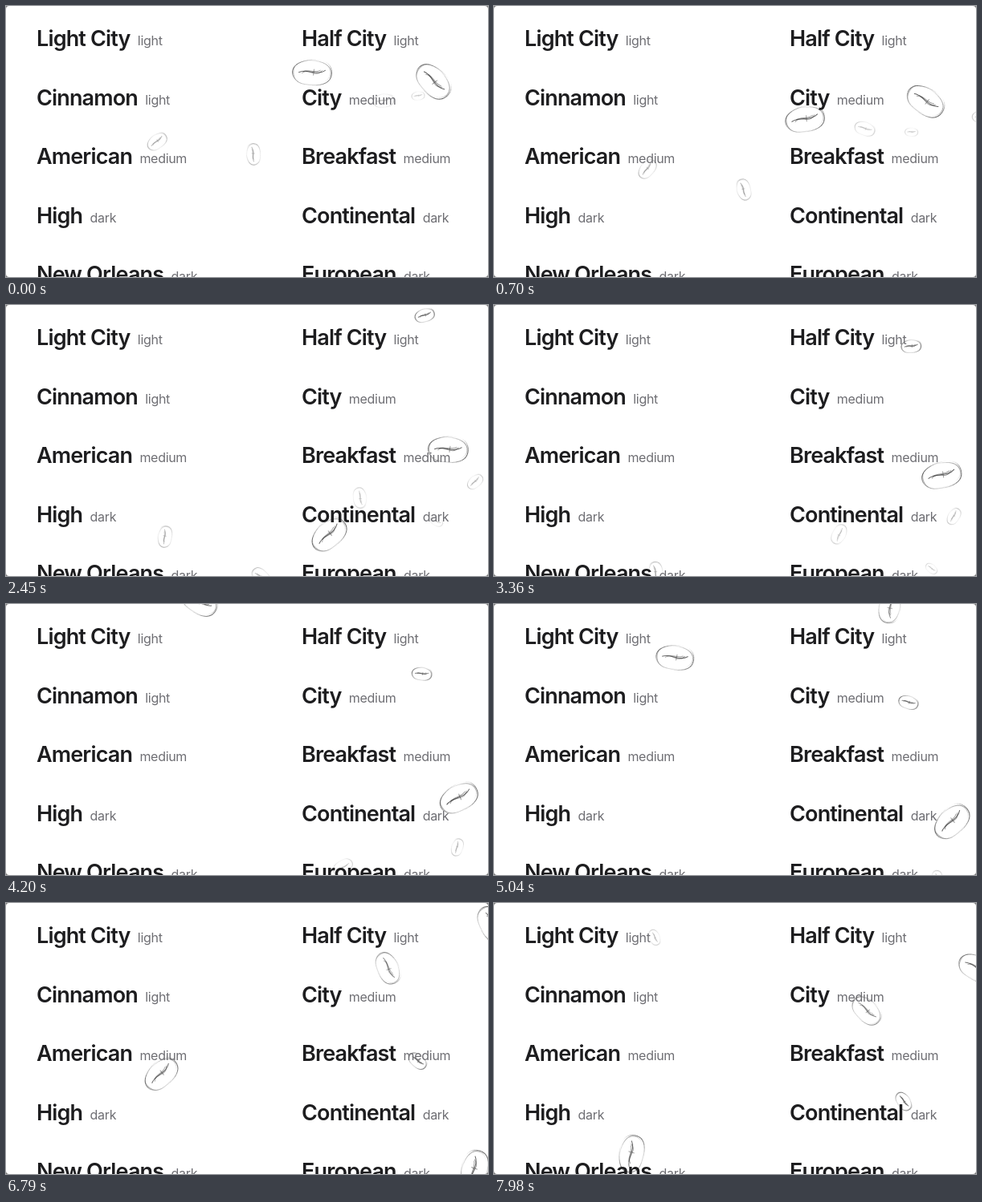
Write an HTML page with a canvas that moves like this. It is 600 px wide and 338 px high and loops after 8000 ms.

```html
<!DOCTYPE html>
<html lang="en">
<head>
<meta charset="utf-8">
<title>Coffee roasts</title>
<style>
  html, body { margin: 0; width: 100%; height: 100%; overflow: hidden; background: #fff; }
  canvas, svg { position: absolute; left: 0; top: 0; width: 600px; height: 338px; }
  text { font-family: Inter, "Open Sans", sans-serif; }
  .name { font-size: 27px; font-weight: 600; letter-spacing: -.85px; fill: #1d1d1f; }
  .level { font-size: 16px; font-weight: 400; letter-spacing: -.3px; fill: #6e6e73; }
</style>
</head>
<body>
<canvas id="stage"></canvas>
<svg id="labels" viewBox="0 0 600 338"></svg>
<script>
const W = 600, H = 338, LOOP = 8000, STEP = 70;
const TAU = 2 * Math.PI;

const roasts = [
  "Light City/light", "Half City/light",
  "Cinnamon/light", "City/medium",
  "American/medium", "Breakfast/medium",
  "High/dark", "Continental/dark",
  "New Orleans/dark", "European/dark"
];

const svg = document.getElementById("labels");
function svgChild(parent, tag, attrs, str = "") {
  const el = document.createElementNS("http://www.w3.org/2000/svg", tag);
  for (const key in attrs) el.setAttribute(key, attrs[key]);
  el.textContent = str;
  return parent.appendChild(el);
}
roasts.forEach((roast, i) => {
  const [name, level] = roast.split("/");
  const line = svgChild(svg, "text", { x: 38 + 330 * (i % 2), y: 50 + 73.6 * (i >> 1) });
  svgChild(line, "tspan", { class: "name" }, name);
  svgChild(line, "tspan", { class: "level", dx: 9.3, dy: -1 }, level);
});

// Place at the loop start; speeds per second. Smaller beans are farther, so fainter.
function bean(x, y, tilt, size, { fall = 46, drift = 4, spin = -18, ink = .75 * (size / 51) ** 1.5 }) {
  return { x, y, tilt, size, fall, drift, spin, ink };
}

const beans = [
  bean(381, 83, 0, 51, { fall: 83, drift: 8.6 }),
  bean(532, 94, 45, 52, { fall: 35.2, drift: 7.5 }),
  bean(470, 118, -10, 27, { fall: 50, drift: -12, spin: 37, ink: .2 }),
  bean(513, 112, -10, 17, { fall: 64.5, drift: 9.4, spin: 14 }),
  bean(188, 169, -40, 28, { fall: 49 }),
  bean(308, 185, -95, 28, { fall: 63 }),
  bean(615, 104, 0, 23, { fall: 47.5, drift: -12.7 }),
  bean(526, -91, -51, 26, { fall: 42.4, drift: -2, spin: 13, ink: .6 }),
  bean(318, -355, 151, 49, { fall: 83.7, drift: -18.4, spin: -29 }),
  bean(542, -221, 186, 43, { fall: 44.5, drift: -9.8 }),
  bean(628, -286, 257, 49, { drift: -3.4, spin: -29 }),
  bean(192, -412, 65, 21, { fall: 57, drift: 1, spin: 0 })
];

const canvas = document.getElementById("stage");
const ctx = canvas.getContext("2d");
const dpr = window.devicePixelRatio || 1;
canvas.width = W * dpr;
canvas.height = H * dpr;

// Uneven, slightly boxy pencil contour around the shell
function contour(r, lean, tone, phase) {
  const point = a => [
    r * (Math.cos(a) - .04 * Math.cos(3 * a)),
    r * (.62 * Math.sin(a) + lean * Math.sin(2 * a))
  ];
  const n = 36;
  for (let i = 0; i < n; i++) {
    const a = i / n * TAU;
    ctx.globalAlpha = tone * (.5 + .5 * Math.sin(2 * a + phase));
    ctx.beginPath();
    ctx.moveTo(...point(a));
    ctx.lineTo(...point(a + TAU / n));
    ctx.stroke();
  }
}

// Wavy line along the bean, from -half to half
function crease(half, wave, offset) {
  ctx.beginPath();
  ctx.moveTo(-half, offset);
  ctx.bezierCurveTo(-half / 3, offset - wave, half / 3, offset + wave, half, offset - wave / 2);
  ctx.stroke();
}

function drawBean(s, b) {
  const r = b.size / 2;
  const x = b.x + b.drift * s, y = b.y + b.fall * s;
  if (y < -r || y > H + r) return;
  ctx.save();
  ctx.translate(x, y);
  ctx.rotate((b.tilt + b.spin * s) * TAU / 360);
  ctx.scale(r, r);
  ctx.strokeStyle = "#333";
  ctx.lineWidth = 1 / r;
  contour(1, .03, b.ink, .8);
  contour(.95, -.03, b.ink * .6, 2.6);

  ctx.globalAlpha = b.ink;
  crease(.66, .2, -.01);
  ctx.globalAlpha = b.ink * .6;
  crease(.5, .28, .03);
  crease(.42, .1, -.06);
  // Short hatch mark across the crease
  ctx.beginPath();
  ctx.moveTo(.1, -.17);
  ctx.lineTo(.06, .14);
  ctx.stroke();
  ctx.restore();
}

function drawCorners() {
  ctx.fillStyle = "#777";
  ctx.beginPath();
  ctx.rect(0, 0, W, H);
  ctx.roundRect(0, 0, W, H, 4);
  ctx.fill("evenodd");
}

function frame(now) {
  const seconds = Math.floor(now % LOOP / STEP) * STEP / 1000;
  ctx.setTransform(dpr, 0, 0, dpr, 0, 0);
  ctx.fillStyle = "#fff";
  ctx.fillRect(0, 0, W, H);
  for (const b of beans) drawBean(seconds, b);
  drawCorners();
}

const start = performance.now();
function tick() {
  frame(performance.now() - start);
  requestAnimationFrame(tick);
}
tick();
</script>
</body>
</html>
```
